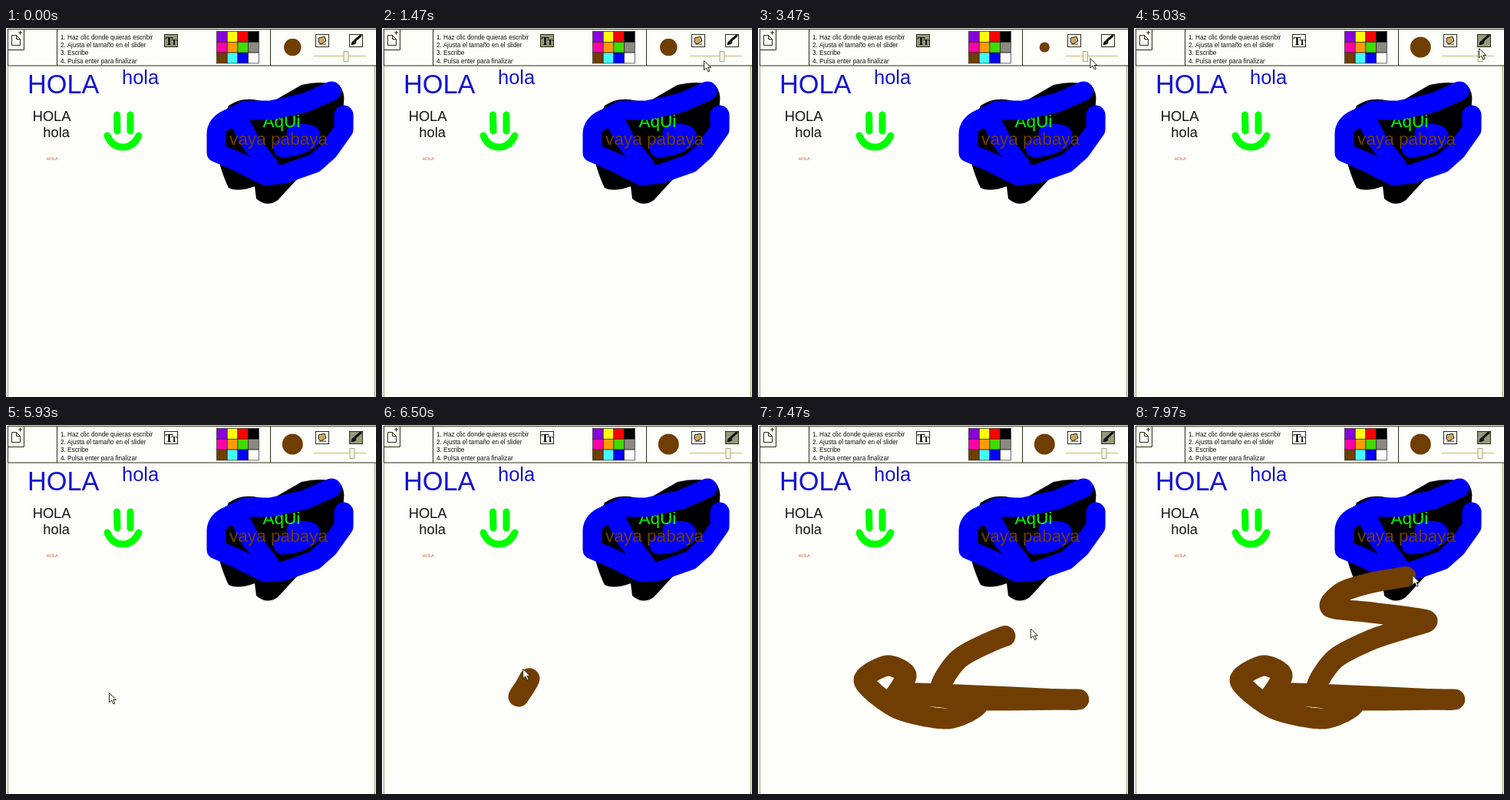
An HTML page that plays this animation: 482x480 px, repeating every 8 s.

```html
<!DOCTYPE html>
<html lang="es">
<head>
<meta charset="utf-8">
<title>Paint</title>
<style>
  html, body { margin: 0; width: 100%; height: 100%; overflow: hidden; background: #fdfdfa; }
  svg { display: block; width: 482px; height: 480px; }
  text { font-family: "Liberation Sans", Arial, sans-serif; white-space: pre; }
  .serif { font-family: "Liberation Serif", serif; font-weight: bold; }
  .brush { fill: none; stroke-linecap: round; stroke-linejoin: round; }
  .line { fill: none; stroke: #2b2b14; }
  .button { stroke: #2b2b14; fill: #fdfdfa; }
  .button.on { fill: #99997c; }
</style>
</head>
<body>
<svg viewBox="0 0 482 480">
  <!-- frame and toolbar -->
  <path d="M2.5 49V480M480.5 49V480" stroke="#99996a"/>
  <path class="line" d="M482 1.5H2.5V49H482M66.5 2V49M344.5 2V49"/>
  <path class="line" d="M3 28.5H23.5V2M7.5 9.5H13.5L18.5 14.5V22.5H7.5ZM13.5 9.5V14.5H18.5M16 6H21M18.5 3.5V8.5"/>
  <g font-size="8.2" fill="#111">
    <text x="71" y="15">1. Haz clic donde quieras escribir</text>
    <text x="71" y="25.2">2. Ajusta el tamaño en el slider</text>
    <text x="71" y="35.4">3. Escribe</text>
    <text x="71" y="45.6">4. Pulsa enter para finalizar</text>
  </g>
  <rect id="textTool" class="button" x="206.5" y="8.5" width="17" height="16"/>
  <text class="serif" x="207.5" y="22" font-size="15">T</text>
  <text class="serif" x="215.5" y="22" font-size="11">T</text>
  <g id="palette" stroke="#222" stroke-width=".7"></g>
  <circle id="preview" cx="373.3" cy="25" fill="#703e02"/>

  <rect class="button" x="403.5" y="8.5" width="17" height="16"/>
  <path class="line" d="M407 13L415 11L417 17L410 21L407 18ZM408 21H417" style="fill:#c9a468"/>
  <rect id="brushTool" class="button" x="447.5" y="8.5" width="17" height="16"/>
  <path class="brush" d="M455 16L462 10" stroke="#111" stroke-width="3"/>
  <path d="M449.5 22Q450 16.5 454 16Q457.5 17 456 20Q453.5 22.5 449.5 22Z" fill="#111"/>
  <path d="M401 36.5H469" stroke="#d6d6a8" stroke-width="2"/>
  <rect id="thumb" y="30.5" width="6" height="13" fill="#f6f6e2" stroke="#aaa680"/>

  <!-- existing drawing -->
  <g fill="#1414d0">
    <text x="28" y="84.6" font-size="34.3">HOLA</text>
    <text x="151" y="72.8" font-size="25.5">hola</text>
  </g>
  <g fill="#111" font-size="18.3">
    <text x="34.7" y="121.3">HOLA</text>
    <text x="48.3" y="142">hola</text>
  </g>
  <text x="52.5" y="172" font-size="5.6" fill="#b5643c">HOLA</text>
  <path class="brush" stroke="#0f0" stroke-width="9" d="M144.5 113L145 134M162 113V134M132 140Q138 155 152.5 155Q166 155 173 140"/>

  <path d="M290 101Q304 91 322 93L345 97L385 74Q410 68 434 74Q442 84 440 97L436 150L378 198L354 224Q340 234 326 222L324 206Q302 214 290 208Q284 196 278 176V130Z"/>
  <g class="brush" stroke="#00f" stroke-width="25">
    <path d="M303 119L318 148L343 180M361 156Q384 154 396 144Q402 136 378 137"/>
    <text x="334.5" y="129.3" font-size="22.5" fill="#0f0" stroke="none">AqUi</text>
    <path d="M424 82L390 97L345 107H312L284 121Q274 128 274 138V162L302 174L338 192L362 190L402 176L420 160L440 132V113"/>
  </g>
  <text x="291" y="151.7" font-size="22.6" fill="#703e02">vaya pabaya</text>

  <path id="paint" class="brush" stroke="#703e02" stroke-width="27"/>
  <path id="cursor" d="M.5 .5V13L3.5 10L6 15L8 14L5.7 9.5H9.5Z" fill="#fdfdfa" stroke="#2b2b14"/>
</svg>
<script>
const LOOP = 8000, ENTER = 1000, GRAB = 1900, DROP = 3700, TOOL_SWITCH = 4930;
const PAINT_START = 6394, POINT_STEP = 72, PAINT_LAG = 50;
const byId = id => document.getElementById(id);

// Pointer stops before painting: time, x, y
const stops = [
  [ENTER, 484, 48], [1470, 419, 42], [GRAB, 449, 39], [DROP, 457, 39], [3970, 449, 26],
  [5080, 449, 26], [5900, 134, 348], [6200, 134, 348], [PAINT_START, 178, 353]
];

// Evenly timed points of the brush stroke: loop, body, straight line, zigzag
const scribble = [
  [178, 353], [193, 325], [168, 313], [138, 333], [182, 369], [248, 382], [286, 361], [200, 349],
  [396, 357], [410, 357], [408, 357], [260, 357], [238, 341], [262, 304], [310, 279], [356, 264],
  [381, 254], [310, 244], [256, 237], [272, 217], [310, 205], [350, 198], [363, 195]
];

const mix = (a, b, u) => a + (b - a) * u;
const clamp = (v, low, high) => Math.min(high, Math.max(low, v));

// The thumb is dragged down and up twice, ending a little higher
function thumbAt(time) {
  const p = clamp((time - GRAB) / (DROP - GRAB), 0, 1);
  return mix(443, 451, p) - 23 * (1 - Math.cos(4 * Math.PI * p));
}

// Cardinal spline through the stroke's points
function scribbleAt(time) {
  const last = scribble.length - 1;
  const position = clamp((time - PAINT_START) / POINT_STEP, 0, last);
  const i = Math.min(Math.floor(position), last - 1), u = position - i;
  const point = k => scribble[clamp(k, 0, last)];
  return [0, 1].map(n => {
    const a = point(i)[n], b = point(i + 1)[n];
    const leave = 0.4 * (b - point(i - 1)[n]), arrive = 0.4 * (point(i + 2)[n] - a);
    return mix(a, b, u * u * (3 - 2 * u)) + u * (1 - u) * ((1 - u) * leave - u * arrive);
  });
}

function pointerAt(time) {
  if (time >= PAINT_START) return scribbleAt(time);
  if (time >= GRAB && time < DROP) return [thumbAt(time) + 6, 39];
  const next = Math.max(1, stops.findIndex(stop => stop[0] > time));
  const [t0, x0, y0] = stops[next - 1], [t1, x1, y1] = stops[next];
  const p = clamp((time - t0) / (t1 - t0), 0, 1), u = p * p * (3 - 2 * p);
  return [mix(x0, x1, u), mix(y0, y1, u)];
}

function paintPath(end) {
  if (end < PAINT_START) return "";
  const points = [];
  for (let time = PAINT_START; time < end; time += 8) points.push(scribbleAt(time));
  return "M" + [...points, scribbleAt(end)].join("L");
}

const colors = ["#8a00dc", "#ff0", "#f00", "#000", "#ff00a8", "#ff9a00", "#40dc00", "#8a8a80",
  "#703e02", "#4ff", "#00f", "#fdfdfa"];
byId("palette").innerHTML = colors.map((color, i) =>
  `<rect x="${274.5 + i % 4 * 13.7}" y="${4.5 + Math.floor(i / 4) * 13.8}" width="13.7" height="13.8" fill="${color}"/>`).join("");

function draw(time) {
  const thumb = thumbAt(time), brushing = time >= TOOL_SWITCH;
  byId("thumb").setAttribute("x", thumb - 3);
  byId("preview").setAttribute("r", Math.max(1, 6.5 + (thumb - 426) * 0.28));
  byId("textTool").classList.toggle("on", !brushing);
  byId("brushTool").classList.toggle("on", brushing);
  byId("paint").setAttribute("d", paintPath(time - PAINT_LAG));
  byId("cursor").setAttribute("transform", `translate(${pointerAt(time)})`);
  byId("cursor").setAttribute("visibility", time < ENTER ? "hidden" : "visible");
}

const start = performance.now();
function tick() {
  draw((performance.now() - start) % LOOP);
  requestAnimationFrame(tick);
}
tick();
</script>
</body>
</html>
```
